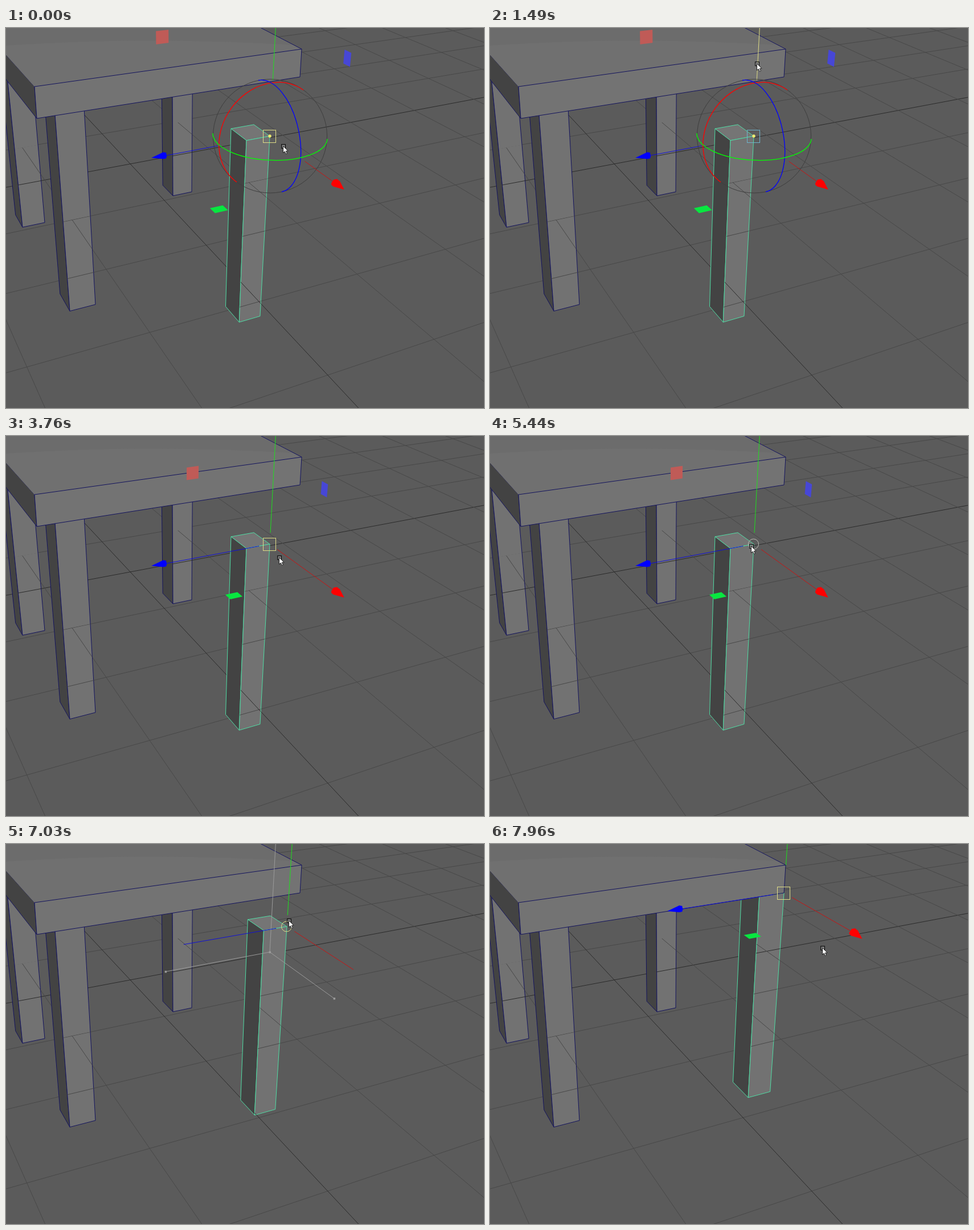
An HTML page for the animation above (8000 ms loop, 839 by 668 pixels).

```html
<!DOCTYPE html>
<html lang="en">
<head>
<meta charset="utf-8">
<title>Moving a table leg</title>
<style>
  html, body { margin: 0; width: 100%; height: 100%; overflow: hidden; background: #5b5b5b; }
  svg { display: block; width: 839px; height: 668px; }
</style>
</head>
<body>
<svg viewBox="0 0 839 668" fill="none">
  <defs>
    <g id="grid"></g>
    <clipPath id="clip-fixed"><path id="fixed-ground"/></clipPath>
    <clipPath id="clip-leg"><path id="leg-ground"/></clipPath>
  </defs>
  <use href="#grid"/>
  <g id="legs"></g>
  <use href="#grid" clip-path="url(#clip-fixed)"/>
  <g id="leg"></g>
  <use href="#grid" clip-path="url(#clip-leg)"/>
  <g id="top"></g>
  <g id="gizmo"></g>
  <g id="cursor">
    <rect x="1.5" y="1.5" width="7" height="7" stroke="#111"/>
    <rect x="3" y="3" width="4" height="4" fill="#888"/>
    <path d="M4.5 4.5V16.5L7.3 13.9L9.3 18.4L11.3 17.5L9.4 13.2H13Z" fill="#fff" stroke="#111" stroke-width=".9"/>
  </g>
</svg>
<script>
const LOOP = 8000, TICK = 120;
const NAVY = '#14145e', MINT = '#50dca4', YELLOW = '#dedc86', CYAN = '#6db4cc';
const DARK = '#434343', FACE = '#727272', GHOST = '#9a9a9a';
const RED = '#f00', GREEN = '#0f0', BLUE = '#00f';
const $ = id => document.getElementById(id);

// Perspective: points are homogeneous, and moving along a world axis
// adds a multiple of that axis's vanishing point.
const ACROSS = [3500, -380, 1], DEPTH = [-427, -452, 1], DOWN = [307, 3087, 1];
const hom = (x, y, w) => [x * w, y * w, w];
const move = (p, a, b, g) => p.map((v, i) => v + a * ACROSS[i] + b * DEPTH[i] + g * DOWN[i]);
const flat = ([x, y, w]) => [x / w, y / w];
const mix = (a, b, f) => a.map((v, i) => v + (b[i] - v) * f);

const closed = pts => 'M' + pts.join('L') + 'Z';
const poly = (pts, fill, stroke = 'none') => `<path d="${closed(pts)}" fill="${fill}" stroke="${stroke}"/>`;
const line = (a, b, color) => `<path d="M${a}L${b}" stroke="${color}"/>`;

function buildGrid() {
  let s = '';
  const add = (a, b, axis) => s += line(a, b, axis ? '#2b2b2b' : '#484848');
  for (let k = -5; k <= 4; k++) {
    const v = 1 / (0.001515 - 0.000167 * k), y = ACROSS[1] + v;
    add([0, y], [839, y - v * 839 / ACROSS[0]], k === 0);
  }
  for (let k = 0; k <= 10; k++) {
    const slope = 2.26 / (1 + 0.555 * k);
    add(DEPTH.slice(0, 2), [839, DEPTH[1] + slope * (839 - DEPTH[0])], k === 2);
  }
  $('grid').innerHTML = s;
}

// A leg hangs from its top right corner; ground is the share of it above the grid.
const WIDTH = -0.01332, THICK = 0.03248, HEIGHT = 0.12265;

function leg(corner, ground, edge) {
  const at = (a, b, g) => flat(move(corner, a * WIDTH, b * THICK, g * HEIGHT));
  const right = at(0, 0, 0), left = at(1, 0, 0), back = at(1, 1, 0);
  const footRight = at(0, 0, 1), footLeft = at(1, 0, 1), footBack = at(1, 1, 1);
  return {
    faces: poly([back, at(0, 1, 0), right, left], '#757575', edge) +
      poly([back, left, footLeft, footBack], DARK, edge) +
      poly([left, right, footRight, footLeft], FACE, edge),
    buried: closed([mix(left, footLeft, ground), mix(right, footRight, ground), footRight, footLeft])
  };
}

function buildTable() {
  const feet = [[68, 342, 1.1855], [326, 288, 1.294], [157, 486, 1.003]];
  const legs = feet.map(p => leg(move(hom(...p), 0, 0, -HEIGHT), 0.57, NAVY));
  $('legs').innerHTML = legs.map(l => l.faces).join('');
  $('fixed-ground').setAttribute('d', legs.map(l => l.buried).join(''));
  const near = [50, 103], far = [519, 37], low = [54, 159];
  $('top').innerHTML =
    poly([[-1, 46], near, low, [-1, 89]], DARK, NAVY) +
    poly([[-2, -2], [446, -2], far, near, [-2, 45]], '#6c6c6c') +
    '<path d="M0 31Q240 14 505 30L519 37L50 103L0 47Z" fill="#707070"/>' +
    line([446, -1], far, NAVY) +
    poly([near, far, [516, 86], low], '#737373', NAVY);
}

// Top right corner of the dragged leg: start, pulled aside, snapped to the table.
const stops = [hom(463, 190, 1), hom(493, 145, 1), hom(516, 86, 0.931)];
const travel = [[0, 0], [6760, 0.06], [6880, 0.36], [7030, 1], [7150, 1.6], [7270, 2]];

function cornerAt(t) {
  const s = travel.findLast(k => k[0] <= t)[1], i = s < 1 ? 0 : 1;
  return mix(stops[i], stops[i + 1], s - i);
}

// Pointer moves: start time, duration, goal.
const moves = [
  [160, 0, 480, 198], [560, 0, 476, 196], [710, 0, 451, 164], [850, 600, 464, 58],
  [2760, 360, 471, 212], [3190, 0, 471, 209], [3340, 240, 475, 228], [3610, 240, 475, 209],
  [4340, 0, 475, 206], [4480, 240, 474, 194], [5160, 360, 454, 189], [5720, 0, 456, 187],
  [6270, 0, 460, 187], [6760, 0, 464, 182], [6880, 240, 492, 130], [7150, 240, 503, 96],
  [7420, 240, 505, 91], [7840, 240, 579, 178]
];

function pointerAt(t) {
  let p = [482, 203];
  for (const [start, span, ...goal] of moves) {
    if (t < start) break;
    const done = (Math.floor((t - start) / TICK) + 1) * TICK;
    p = mix(p, goal, Math.min(1, done / Math.max(span, TICK)));
  }
  return p;
}

// Manipulator ends keep their screen size, so world offsets scale with depth.
const handle = (c, a, b, g) => flat(move(c, a * c[2], b * c[2], g * c[2]));
const ends = c => [handle(c, -0.0568, 0, 0), handle(c, 0, -0.1127, 0), handle(c, 0, 0, -0.066)];

function axis(from, to, gap, color) {
  const len = Math.hypot(to[0] - from[0], to[1] - from[1]);
  return line(mix(from, to, gap / len), to, color);
}

// Half an ellipse between opposite ends; the radii scale up to fit.
const arc = (start, end, ratio, turn, sweep, color) =>
  `<path d="M${start}A1 ${ratio} ${turn} 0 ${sweep} ${end}" stroke="${color}" stroke-width="1.3"/>`;

const rings = () => '<circle cx="463.5" cy="190" r="100" stroke="#3e3e3e"/>' +
  arc([405, 271], [522, 109], 0.84, -54, 1, RED) +
  arc([443, 92], [484, 288], 0.51, 78.2, 1, BLUE) +
  arc([363, 185], [564, 195], 0.42, 2.85, 0, GREEN);

const cone = (at, d, color) => `<path transform="translate(${at})" d="${d}" fill="${color}"/>`;
const cones = (blue, red, redColor) =>
  cone(blue, 'M-25 4L-4 -6L1 -5L2 1L1 5L-4 6Z', BLUE) +
  cone(red, 'M17.5 12.5L10 -2L5 -6L-1 -5L-5 1L-5 4L-2 7Z', redColor);

// One square per pair of axes.
function planes(c, reach) {
  const mid = [-0.043, -0.085, -0.0477].map(v => v * reach), half = [0.003, 0.0047, 0.0033];
  const square = (skip, color) => poly([[-1, -1], [1, -1], [1, 1], [-1, 1]].map(signs => {
    const sign = signs.slice();
    sign.splice(skip, 0, 0);
    return handle(c, ...mid.map((m, i) => i === skip ? 0 : m + sign[i] * half[i]));
  }), color);
  return square(0, '#4747d6') + square(1, '#c05b57') + square(2, '#08e640');
}

function ghost() {
  const c = flat(stops[0]), [blue, red, green] = ends(stops[0]);
  const dot = ([x, y]) => `<rect x="${x - 1.5}" y="${y - 1.5}" width="3.5" height="3.5" fill="${GHOST}"/>`;
  return [blue, red, green].map(p => line(c, p, GHOST)).join('') + [c, blue, red].map(dot).join('');
}

function drawGizmo(t, corner) {
  const combined = t < 2320, moved = t >= 7840, drag = t >= 6640 && !moved;
  const pressed = drag || (t >= 1340 && t < 1490);
  const redHot = t >= 4610 && t < 5440, greenHot = t >= 1090 && combined;
  const gap = combined ? [93, 76, 98] : [19, 16, moved ? 49 : 20];
  const c = flat(corner), [x, y] = c, [blue, red, green] = ends(corner);
  const redColor = redHot ? YELLOW : RED;
  let s = drag ? ghost() : '';
  s += axis(c, blue, gap[0], '#1010d8') +
    axis(c, red, gap[1], redHot ? YELLOW : '#c81414') +
    axis(c, green, gap[2], greenHot ? YELLOW : '#1ee01e');
  if (combined) s += rings();
  if (!pressed) s += cones(blue, red, redColor) + planes(corner, combined ? 1.345 : 1);
  const color = t >= 1340 && combined ? CYAN : t >= 5440 && t < 6640 ? '#bdbdb4' : YELLOW;
  s += t >= 4890 && !moved
    ? `<circle cx="${x - 0.5}" cy="${y}" r="9" stroke="${color}"/>`
    : `<rect x="${x - 11.5}" y="${y - 10.5}" width="22" height="22" stroke="${color}"/>`;
  if (combined) s += `<circle cx="${x}" cy="${y}" r="2.7" fill="#f0ec70"/>`;
  $('gizmo').innerHTML = s;
}

function render(t) {
  const corner = cornerAt(t), { faces, buried } = leg(corner, 0.235, MINT);
  $('leg').innerHTML = faces;
  $('leg-ground').setAttribute('d', buried);
  drawGizmo(t, corner);
  $('cursor').setAttribute('transform', `translate(${pointerAt(t).map(Math.round)})`);
}

buildGrid();
buildTable();
const start = performance.now();
function tick() {
  render((performance.now() - start) % LOOP);
  requestAnimationFrame(tick);
}
tick();
</script>
</body>
</html>
```
